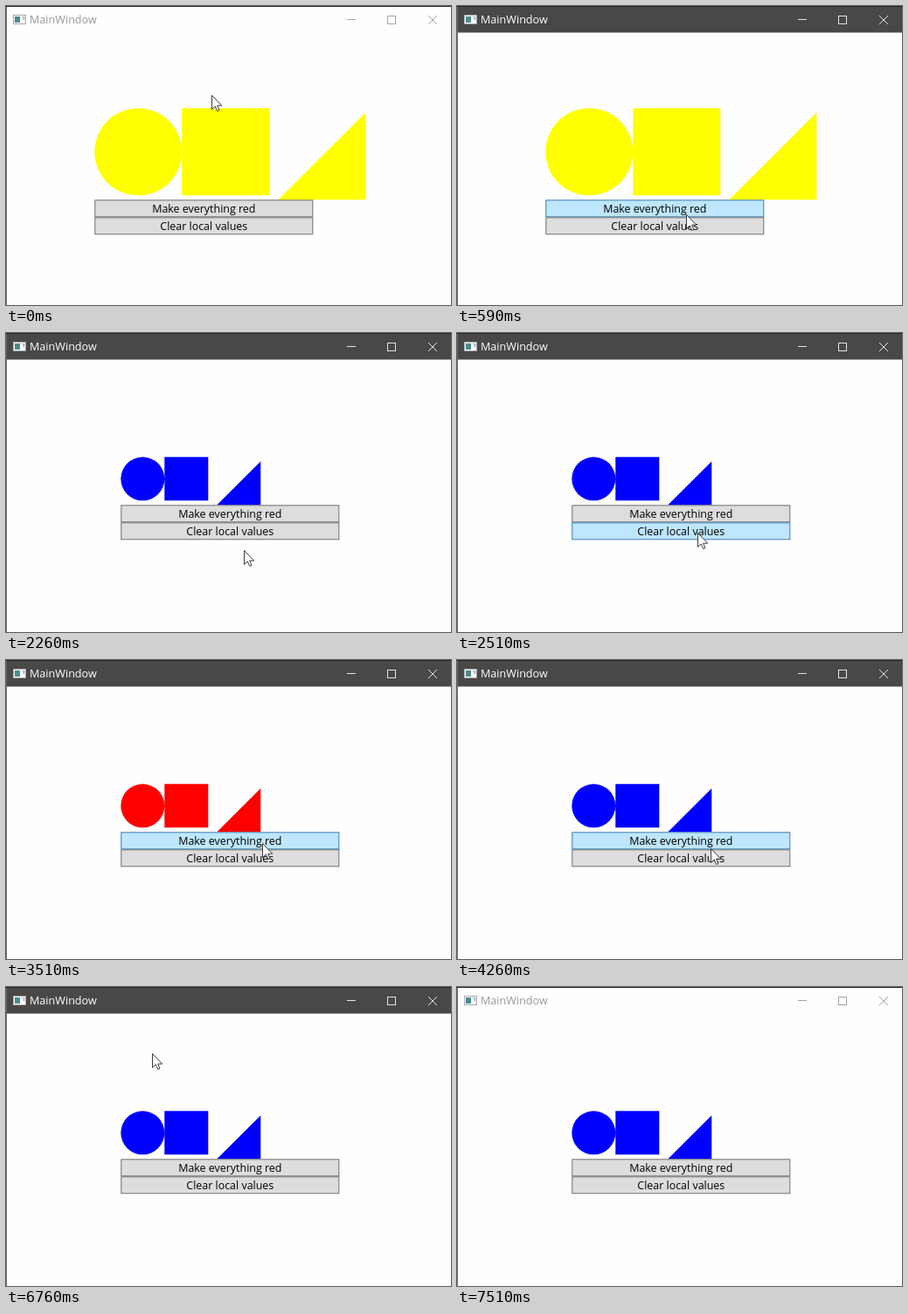
These frames come from a looping animation (509x343 px, 7600 ms). An HTML page:

```html
<!DOCTYPE html>
<html lang="en">
<head>
<meta charset="utf-8">
<title>MainWindow</title>
<style>
  html, body { margin: 0; width: 100%; height: 100%; overflow: hidden; background: #fefefe; }
  svg { display: block; width: 509px; height: 343px; font: 12.45px "Open Sans", "Noto Sans", sans-serif; }
  #bar { fill: #4a4846; }
  #title { fill: #fff; font-size: 12.6px; }
  #controls { fill: none; stroke: #e4e4e4; }
  .inactive #bar { fill: #fefefe; }
  .inactive #title { fill: #999; }
  .inactive #controls { stroke: #a4a4a4; }
  .button rect { fill: #ddd; stroke: #707070; }
  .button text { fill: #000; text-anchor: middle; }
  .button.hover rect { fill: #bee6fd; stroke: #3c7fb1; }
</style>
</head>
<body>
<svg id="window" viewBox="0 0 509 343">
  <rect width="509" height="343" fill="#fefefe"/>
  <rect id="bar" width="509" height="30.5"/>
  <rect width="509" height="1" fill="#262524"/>
  <rect y="1" width="1" height="342" fill="#666"/>

  <rect x="8.5" y="10.5" width="14" height="10" fill="#fff" stroke="#a3a7ab"/>
  <rect x="10" y="12" width="6" height="7" fill="#4b8c8c"/>
  <path d="M18 12.5h1M20.5 12v4" stroke="#7d8588"/>
  <text id="title" x="27" y="20">MainWindow</text>
  <g id="controls">
    <path d="M390 15.5h10"/>
    <rect x="436.5" y="11.5" width="9" height="9"/>
    <path d="M483 11l10 10M493 11l-10 10"/>
  </g>

  <path id="shapes"/>
  <g class="button">
    <rect x=".5" y=".5" width="249" height="19"/>
    <text x="125" y="15">Make everything red</text>
  </g>
  <g class="button">
    <rect x=".5" y=".5" width="249" height="19"/>
    <text x="125" y="15">Clear local values</text>
  </g>

  <path id="cursor" d="M.5 .5V16.5L4.2 13L6.7 18.5L9 17.5L6.6 12.2H11.7Z"
        fill="#fff" stroke="#26262c" stroke-width=".9"/>
</svg>
<script>
const LOOP = 7600, STEP = 1000 / 12;
const ACTIVATE = 2, DEACTIVATE = 90;
const $ = id => document.getElementById(id);
const buttons = [...document.querySelectorAll(".button")];

// Ticks of the clicks, in turn on the red and the clear button
const clicks = [9, 27, 35, 47, 55, 74];

const cursorStart = { x: 235, y: 102 };
const moves = [
  { from: 0, to: 7, x: 262, y: 239 },
  { from: 8, to: 15, x: 267, y: 230 },
  { from: 17, to: 21, x: 272, y: 249 },
  { from: 27, to: 30, x: 275, y: 229 },
  { from: 30, to: 37, x: 294, y: 205 },
  { from: 41, to: 44, x: 291, y: 220 },
  { from: 48, to: 58, x: 288, y: 208 },
  { from: 63, to: 67, x: 287, y: 228 },
  { from: 74, to: 87, x: 64, y: -54 }
];

function cursorAt(tick) {
  let { x, y } = cursorStart;
  for (const m of moves) {
    const u = Math.min(1, Math.max(0, (tick - m.from) / (m.to - m.from)));
    x += (m.x - x) * u;
    y += (m.y - y) * u;
  }
  return [Math.round(x), Math.round(y)];
}

// Circle, square and triangle in a row, each of size s
function shapesPath(s) {
  const r = s / 2;
  return `M0 ${r}a${r} ${r} 0 1 1 ${s} 0a${r} ${r} 0 1 1 ${-s} 0z` +
    `M${s} 0h${s}v${s}h${-s}z` +
    `M${2 * s + 10} ${s + 5}l${s} ${-s}v${s}z`;
}

const place = (el, x, y) => el.setAttribute("transform", `translate(${x} ${y})`);

function draw(tick) {
  const [x, y] = cursorAt(tick);
  const done = clicks.filter(c => c <= tick).length;
  const size = done < 2 ? 100 : 50;

  // The content is centred in the window
  const left = 256.3 - Math.max(250, 3 * size + 10) / 2;
  const top = 189.8 - (size + 45) / 2;

  $("window").classList.toggle("inactive", tick < ACTIVATE || tick >= DEACTIVATE);
  $("shapes").setAttribute("d", shapesPath(size));
  $("shapes").setAttribute("fill", done % 2 ? "#f00" : done ? "#00f" : "#ff0");
  place($("shapes"), left, top);
  place($("cursor"), x, y);

  buttons.forEach((button, i) => {
    const row = top + size + 5 + 20 * i;
    place(button, left, row);
    button.classList.toggle("hover",
      x >= left && x < left + 250 && y >= row && y < row + 20);
  });
}

const start = performance.now();
function frame() {
  const t = (performance.now() - start) % LOOP;
  draw(Math.max(0, Math.floor((t - 6) / STEP)));
  requestAnimationFrame(frame);
}
frame();
</script>
</body>
</html>
```
